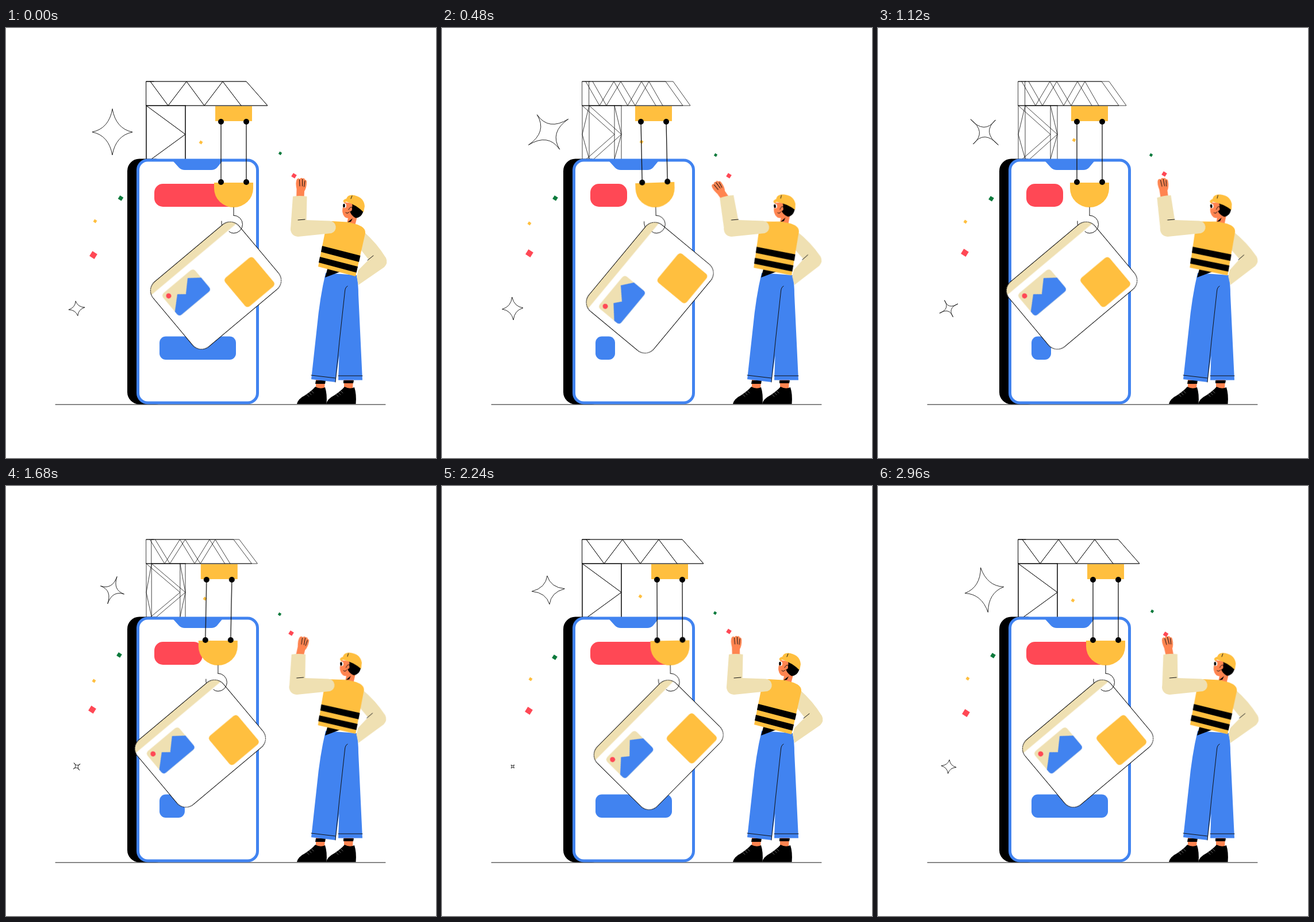
An HTML page without scripts for the animation above (3.04 s loop, 748 by 748 pixels).

```html
<!DOCTYPE html>
<html lang="en">
<head>
<meta charset="utf-8">
<title>Crane and builder</title>
<style>
@property --sway { syntax: "<number>"; inherits: true; initial-value: 0; }
html, body { margin: 0; width: 100%; height: 100%; overflow: hidden; background: #fff; }
svg { display: block; width: 100%; height: 100%; }
.blue { fill: #4183f0; }
.yellow { fill: #ffbf3f; }
.red { fill: #ff4855; }
.green { fill: #0c7a3c; }
.cream { fill: #efe0b2; }
.skin { fill: #ff8450; }
.ink { fill: none; stroke: #111; stroke-width: 1; stroke-linecap: round; stroke-linejoin: round; }

/* main 3040 ms loop */
.truss, .trolley, .bucket, .card, .red-bar, .blue-bar {
  animation: 3040ms ease-in-out infinite;
}
.truss { d: var(--a); stroke-width: .8; animation-name: truss; }
@keyframes truss {
  0%, 2% { d: var(--a); }
  14.5%, 51.3% { d: var(--b); }
  63.2%, 100% { d: var(--a); }
}
.trolley { animation-name: trolley, sway; }
@keyframes trolley {
  0%, 2.6% { transform: translate(396px, 163px); }
  15.6%, 52.6% { transform: translate(368px, 163px); }
  64.8%, 100% { transform: translate(396px, 163px); }
}
/* sideways lag of the load, in px */
@keyframes sway {
  0%, 3% { --sway: 0; }
  10.5% { --sway: 4; }
  15.8% { --sway: 2.2; }
  21% { --sway: -1.5; }
  27% { --sway: .5; }
  33%, 52.6% { --sway: 0; }
  55.3% { --sway: -2; }
  59.5% { --sway: -4; }
  65.8% { --sway: -1; }
  71% { --sway: .9; }
  73.7% { --sway: .4; }
  80%, 100% { --sway: 0; }
}
.ropes { transform: skewX(calc(var(--sway) * .545deg)); }
.load { transform: translate(calc(var(--sway) * 1px), 105px); }
.bucket { animation-name: bucket; }
@keyframes bucket {
  0%, 3% { transform: rotate(0deg); }
  15.8% { transform: rotate(-2deg); }
  22% { transform: rotate(1deg); }
  30%, 55.3% { transform: rotate(0deg); }
  60% { transform: rotate(2deg); }
  65.8% { transform: rotate(.3deg); }
  73.7% { transform: rotate(-1deg); }
  82%, 100% { transform: rotate(0deg); }
}
.card { animation-name: card; }
@keyframes card {
  0%, 3.5% { transform: rotate(0deg); }
  14% { transform: rotate(-8.5deg); }
  15.8% { transform: rotate(-8.3deg); }
  18.4% { transform: rotate(-7deg); }
  26% { transform: rotate(5deg); }
  31.6% { transform: rotate(-2deg); }
  36%, 55.3% { transform: rotate(0deg); }
  60.5% { transform: rotate(8.5deg); }
  65.8% { transform: rotate(4.5deg); }
  73% { transform: rotate(-4.4deg); }
  80% { transform: rotate(2deg); }
  87% { transform: rotate(-.7deg); }
  92%, 100% { transform: rotate(0deg); }
}
.red-bar { animation-name: red-bar; }
@keyframes red-bar {
  0%, 2% { width: 147px; }
  15%, 51.3% { width: 64px; }
  63.2%, 100% { width: 147px; }
}
.blue-bar { animation-name: blue-bar; }
@keyframes blue-bar {
  0%, 2.6% { width: 133px; }
  15.8%, 52.6% { width: 34px; }
  64.8%, 100% { width: 133px; }
}

/* twinkles */
.star { vector-effect: non-scaling-stroke; stroke-width: .9; }
.big { animation: spin 3040ms linear infinite, big 3040ms linear infinite; }
.small { animation: spin-back 3040ms linear infinite, small 3040ms linear infinite; }
.big .star { animation: thin-big 3040ms linear infinite; }
.small .star { animation: thin-small 3040ms linear infinite; }
@keyframes spin { to { rotate: 360deg; } }
@keyframes spin-back { from { rotate: -8deg; } to { rotate: -548deg; } }
@keyframes big {
  0% { scale: 1; }
  15.8% { scale: 1.03; }
  36.8% { scale: .82; }
  55.3% { scale: .62; }
  65.8% { scale: .64; }
  73.7% { scale: .71; }
  97.4% { scale: .98; }
  100% { scale: 1; }
}
@keyframes small {
  0% { scale: .71; }
  15.8% { scale: 1; }
  36.8% { scale: .9; }
  55.3% { scale: .4; }
  65.8% { scale: .26; }
  73.7% { scale: .2; }
  97.4% { scale: .66; }
  100% { scale: .71; }
}
.star { --fat: path("M0 -40Q6 -6 35 0Q6 6 0 40Q-6 6 -35 0Q-6 -6 0 -40Z");
  --mid: path("M0 -40Q1 -1 35 0Q1 1 0 40Q-1 1 -35 0Q-1 -1 0 -40Z");
  --slim: path("M0 -40Q-4 4 35 0Q-4 -4 0 40Q4 -4 -35 0Q4 4 0 -40Z");
  d: var(--fat); }
@keyframes thin-big {
  0%, 73.7%, 100% { d: var(--fat); }
  15.8% { d: var(--mid); }
  36.8% { d: var(--slim); }
  58% { d: var(--mid); }
}
@keyframes thin-small {
  0%, 15.8%, 97.4%, 100% { d: var(--fat); }
  36.8%, 55.3% { d: var(--slim); }
  73.7% { d: var(--mid); }
}

/* confetti */
.bit { rotate: 32deg; animation: drift 3040ms linear infinite; }
@keyframes drift {
  0%, 100% { translate: var(--a); }
  15.8% { translate: var(--b); }
  36.8% { translate: var(--c); }
  55.3% { translate: var(--d); }
  65.8% { translate: var(--e); }
  73.7% { translate: var(--f); }
  97.4% { translate: var(--g); }
}

/* builder waves four times per loop */
.torso, .head, .back-arm, .arm, .forearm, .hand { animation: 760ms linear infinite; }
.torso { --r: -3.3deg; transform-origin: 577px 428px; animation-name: lean; }
.head { --r: -5deg; transform-origin: 601px 335px; animation-name: lean; }
.back-arm { --r: -3deg; transform-origin: 612px 446px; animation-name: lean; }
@keyframes lean {
  0%, 94.7%, 100% { transform: rotate(0deg); }
  21% { transform: rotate(calc(var(--r) * .55)); }
  47.4% { transform: rotate(calc(var(--r) * .92)); }
  63.2% { transform: rotate(var(--r)); }
  89.5% { transform: rotate(calc(var(--r) * .18)); }
}
.arm { animation-name: arm; }
@keyframes arm {
  0%, 94.7%, 100% { transform: translate(0, 0); }
  21% { transform: translate(-2.3px, 0); }
  47.4% { transform: translate(-4.2px, 0); }
  63.2% { transform: translate(-4.6px, 0); }
  89.5% { transform: translate(-.8px, 0); }
}
.forearm { transform-origin: 507px 348px; animation-name: forearm; }
@keyframes forearm {
  0%, 21%, 94.7%, 100% { transform: rotate(0deg); }
  47.4% { transform: rotate(-10deg); }
  63.2% { transform: rotate(-12deg); }
  89.5% { transform: rotate(-2deg); }
}
.hand { transform-origin: 512px 303px; animation-name: hand; }
@keyframes hand {
  0%, 100% { transform: rotate(0deg); }
  21% { transform: rotate(11deg); }
  47.4% { transform: rotate(0deg); }
  63.2% { transform: rotate(-25deg); }
  89.5% { transform: rotate(-12deg); }
  94.7% { transform: rotate(-3deg); }
}
</style>
</head>
<body>
<svg viewBox="0 0 748 748">
  <path class="ink" d="M86 655H660"/>

  <g transform="translate(185 181)"><g class="big"><path class="star ink"/></g></g>
  <g transform="translate(123 488)"><g class="small"><path class="star ink" transform="scale(.57 .45)"/></g></g>

  <!-- crane frame: two faces and two sides -->
  <g class="ink">
    <path class="truss" style='--a:path("M244 93L418 93L455 135L244 135ZM251 93L282 135L314 93L345 135L377 93L409 135");--b:path("M244 93L389 93L419 135L244 135ZM250 93L274 135L299 93L323 135L347 93L372 135")'/>
    <path class="truss" style='--a:path("M244 93L418 93L455 135L244 135ZM251 93L282 135L314 93L345 135L377 93L409 135");--b:path("M256 93L402 93L432 135L256 135ZM262 93L286 135L311 93L336 135L360 93L384 135")'/>
    <path class="truss" style='--a:path("M244 135L244 228M312 135L312 228M244 135L312 185L253 228");--b:path("M244 135L244 228M300 135L300 228M244 135L300 185L251 228")'/>
    <path class="truss" style='--a:path("M244 135L244 228M312 135L312 228M244 135L312 185L253 228");--b:path("M256 135L256 228M312 135L312 228M256 135L312 185L264 228")'/>
    <path class="truss" style='--a:path("M244 135L244 185L244 228M312 135L312 185L312 228");--b:path("M256 135L244 185L256 228M300 135L312 185L300 228")'/>
    <path d="M244 93H257M244 135H312"/>
  </g>

  <!-- phone -->
  <rect x="211" y="227.5" width="70" height="427" rx="21"/>
  <rect x="229.5" y="230" width="208" height="422" rx="17" fill="#fff" stroke="#4183f0" stroke-width="5"/>
  <path class="blue" d="M291 232H376L367 243Q363 247 357 247H311Q305 247 301 243Z"/>
  <rect class="red red-bar" x="258" y="271" width="147" height="40" rx="15"/>
  <rect class="blue blue-bar" x="267" y="536.5" width="133" height="40.5" rx="11"/>

  <!-- confetti -->
  <rect class="bit red" x="-5" y="-5" width="10" height="10" style="--a:152px 395px;--b:152px 392px;--c:151px 391px;--d:150px 389px;--e:148px 391px;--f:151px 391px;--g:153px 395px"/>
  <rect class="bit green" x="-3.5" y="-3.5" width="7" height="7" style="--a:199.5px 296px;--b:197px 296px;--c:197px 297px;--d:197px 294px;--e:198px 294px;--f:196px 298px;--g:200px 295px"/>
  <rect class="bit yellow" x="-2.5" y="-2.5" width="5" height="5" style="--a:155px 336px;--b:152px 340px;--c:152px 337px;--d:153px 339px;--e:155px 338px;--f:154px 336px;--g:156px 335px"/>
  <rect class="bit yellow" x="-2.5" y="-2.5" width="5" height="5" style="--a:339px 199px;--b:347px 198px;--c:341px 195px;--d:346px 196px;--e:344px 194px;--f:345px 192px;--g:339px 199px"/>
  <rect class="bit green" x="-2.3" y="-2.3" width="4.6" height="4.6" style="--a:477px 218px;--b:476px 221px;--c:475px 221px;--d:476px 223px;--e:476px 224px;--f:475px 221px;--g:477px 218px"/>
  <rect class="bit red" x="-3.5" y="-3.5" width="7" height="7" style="--a:501px 257px;--b:499px 257px;--c:498px 254px;--d:496px 256px;--e:497px 253px;--f:499px 253px;--g:500.5px 258px"/>

  <!-- hoist -->
  <g class="trolley">
    <rect class="yellow" x="-32" y="-27" width="64" height="26"/>
    <g class="load"><g class="bucket">
      <path class="yellow" d="M-34 1H34V11A34 33 0 0 1 -34 11Z"/>
      <circle cx="-22" r="5"/><circle cx="22" r="5"/>
      <path class="ink" d="M0 44V58M-21 68V72Q-20 84 -8 88"/>
      <g transform="translate(0 72)"><g class="card">
        <g transform="translate(-31 108) rotate(-40)">
          <rect x="-97.5" y="-73.5" width="195" height="147" rx="20" fill="#fff"/>
          <path class="cream" d="M-96.6 -59.5A20 20 0 0 1 -77.5 -73.5H77.5A20 20 0 0 1 96.6 -59.5Z"/>
          <rect class="ink" x="-97.5" y="-73.5" width="195" height="147" rx="20"/>
          <rect class="yellow" x="16.2" y=".5" width="65" height="65" rx="6"/>
          <rect class="cream" x="-83.7" y="-48.4" width="73" height="49" rx="6"/>
          <path class="blue" d="M-83.7 -11L-61 -31.6L-49.5 -22L-29.2 -41.5L-10.7 -27V-5.4q0 6-6 6H-77.7q-6 0-6-6Z"/>
          <circle class="red" cx="-74.4" cy="-38.9" r="4.5"/>
        </g>
      </g></g>
      <path class="ink" d="M0 58A15.5 15.5 0 0 1 0 89Q-5 89 -8 86"/>
    </g></g>
    <path class="ropes ink" style="stroke-width:1.3" d="M-22 0V105M22 0V105"/>
    <circle cx="-22" r="5"/><circle cx="22" r="5"/>
  </g>

  <!-- builder: legs -->
  <path class="skin" d="M539 612H555L554 628H539ZM588 612H604L603 628H588Z"/>
  <path d="M539 613H556L555 619H538ZM587 613H605L604 618H587Z"/>
  <path id="shoe" d="M506 654Q508 645 520 639Q532 631 538 624Q547 629 555 625Q559 637 557.5 654Z"/>
  <use href="#shoe" x="51"/>
  <path class="ink" style="stroke:#999;stroke-width:.7" d="M523 637l4 4M527 634l4 4M531 631l4 4M574 637l4 4M578 634l4 4M582 631l4 4"/>
  <path class="blue" d="M556 426L610 430Q613 445 613 464L620 612.5H578L579.5 570L573 616L531 611L541 520Q546 468 556 426Z"/>
  <path class="ink" d="M594 449Q590 451 589.5 458L580 545L573 616M531 604L573 609M578 605H620"/>
  <path d="M555 434L560 416L584 423Z"/>

  <path class="back-arm cream" d="M622 354Q645 374 661 400Q665 409 658 416L613 447L610 432L613 421L631 403L615 383Z"/>
  <path class="back-arm ink" d="M629 404L639 396"/>

  <g class="torso">
    <path class="skin" d="M596 326L611 328L607 344L593 340Z"/>
    <path d="M603 331L594 338L600 337Z"/>
    <path class="yellow" d="M543 415L557 345Q559 335 567 336L594 337.5L608 341Q626 346 625 357L608 432Z"/>
    <path d="M550 379L616.5 396L614 407L548 389.5ZM546 398L612 415L609.5 425.5L544 408Z"/>
    <g class="head">
      <path class="skin" d="M589 303Q584 315 585.5 321Q587 331 597 331L603 330L610 306Z"/>
      <path d="M602 305L622 317Q619 330 608 330.5Q600 326 598 318Q604 313 602 305Z"/>
      <circle class="skin" cx="598" cy="315" r="4"/>
      <ellipse cx="589" cy="309" rx="3" ry="4" fill="#fff"/>
      <ellipse cx="588" cy="309" rx="1.8" ry="3.2"/>
      <path class="ink" d="M596 316Q599 310 602 312M591 321Q594 324 597 320"/>
      <path class="yellow" d="M588 304Q584 299 592 297Q595 289 606 291Q623 295 624 310L622 320.5Q610 308 592 302Z"/>
      <path class="ink" d="M602 292L600 297"/>
    </g>
  </g>

  <g class="arm">
    <g class="forearm">
      <g class="hand">
        <path class="skin" d="M505 304L505.5 280Q503 268 506 263Q509 260 511 263Q513 259 516 262Q519 260 520 264Q523 264 523 268Q523 278 519 284L518 304Z"/>
        <path class="ink" d="M510.5 264L511 275M515.5 263V275M520 266L518.5 276"/>
      </g>
      <path class="cream" d="M499 293Q511 291 523.5 293L522.5 340L517 357A12.5 12.5 0 0 1 495 350Z"/>
    </g>
    <path class="cream" d="M506 333.5L563 335.5A11 11 0 0 1 566 357L508 363Q495.5 362 495 349Z"/>
    <path class="ink" d="M508 334L520 333"/>
  </g>
</svg>
</body>
</html>
```
